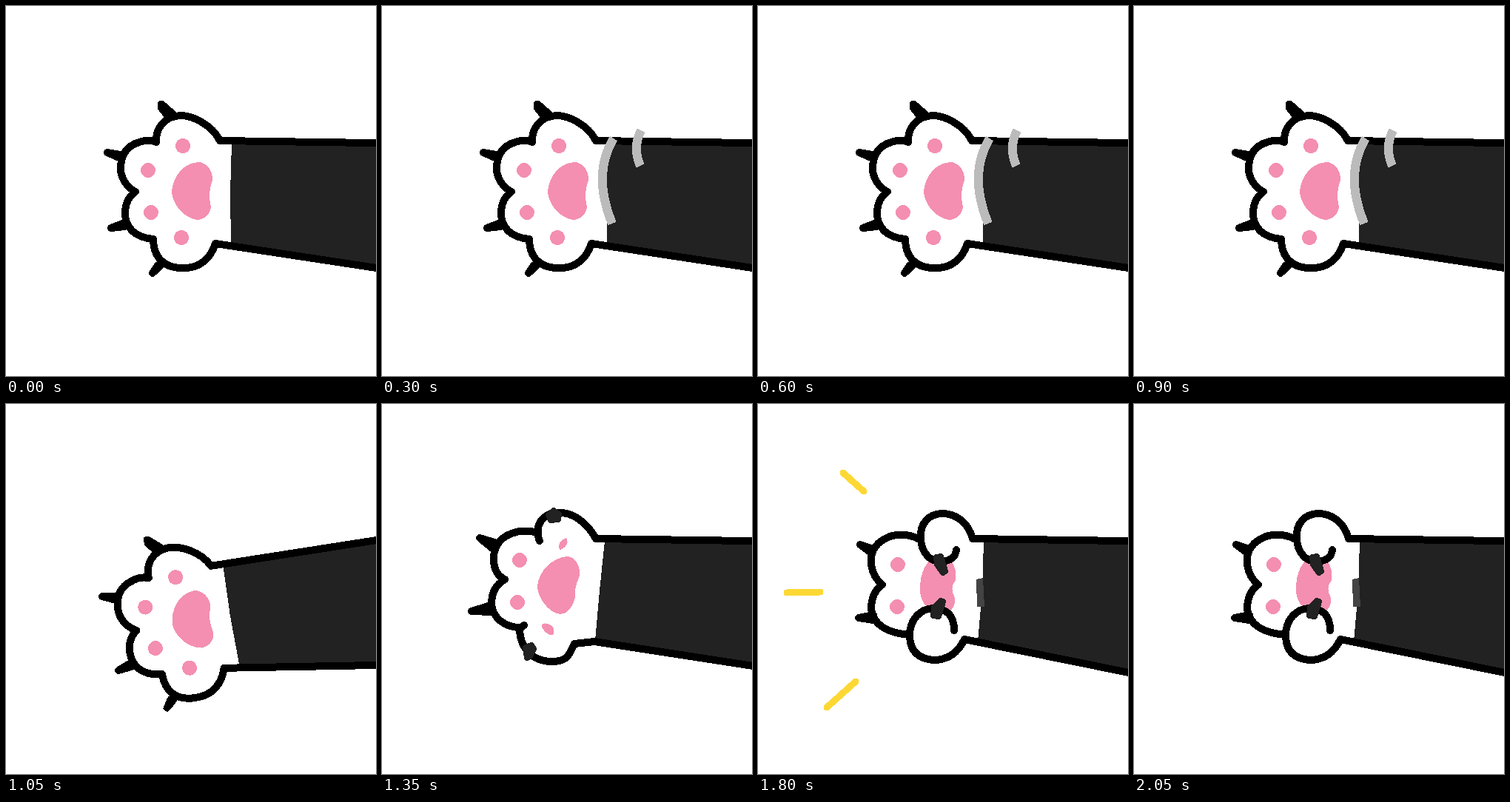
An HTML page for the animation above (2.55 s loop, 500 px wide and 500 px high).

```html
<!DOCTYPE html>
<html lang="en">
<head>
<meta charset="utf-8">
<title>Cat paw</title>
<style>
  html, body { margin: 0; width: 100%; height: 100%; overflow: hidden; background: #fff; }
  svg { display: block; width: 100%; height: 100%; }
  path { stroke-linecap: round; stroke-linejoin: round; fill: none; }
</style>
</head>
<body>
<svg viewBox="0 0 500 500" shape-rendering="crispEdges">
  <g id="paw"></g>
  <path id="swish" stroke="#bbb" stroke-width="12" style="stroke-linecap:butt"
    d="M313,179C293,212 293,250 311,294M350,168C342,184 342,200 349,216"/>
  <g id="rays" stroke="#fdd835" stroke-width="9">
    <path d="M131,109L159,134"/>
    <path d="M70,255L115,254"/>
    <path d="M116,387L155,352"/>
  </g>
</svg>
<script>
const PINK = '#f48fb1', DARK = '#222';

// Layers from back to front; every pose lists one path per layer.
const layers = [
  { name: 'sleeve', fill: DARK },
  { name: 'pad', fill: PINK },
  { name: 'midToes', stroke: '#000', width: 10 },
  { name: 'dots', stroke: PINK, width: 20 },
  { name: 'arm', stroke: '#000', width: 10 },
  { name: 'outerToes', fill: '#fff', stroke: '#000', width: 10 },
  { name: 'beans', fill: PINK },
  { name: 'claws', stroke: '#000', width: 10 },
  { name: 'tips', fill: DARK, stroke: DARK, width: 8 },
  { name: 'cuff', fill: '#444' }
];

const open = {
  sleeve: 'M305,185L560,186L560,362L304,322L303,252Z',
  pad: 'M260,211C270,211 280,222 279,235C274,250 274,258 277,272C275,285 265,289 258,289C238,286 224,265 224,250C226,230 240,212 260,211Z',
  midToes: 'M203,184C196,181 188,181 180,184C160,190 155,205 155,220C155,232 163,245 175,251C165,258 161,268 161,280C161,300 175,313 199,315',
  dots: 'M192,222L192,222M196,279L196,279',
  arm: 'M289,182L560,186M283,321L283,321L560,363',
  outerToes: 'M289,182C278,160 252,148 236,148C214,149 202,165 203,184C203,184 203,184 203,184C203,184 203,184 203,184' +
    'M283,321C276,343 260,355 238,354C211,354 199,337 199,315C199,315 199,315 199,315C199,315 199,315 199,315',
  beans: 'M239,179C252.3,179 252.3,199 239,199C225.7,199 225.7,179 239,179M237,303C250.3,303 250.3,323 237,323C223.7,323 223.7,303 237,303',
  claws: 'M137,198L155,201M137,198L155,206M142,300L160,293M142,300L160,298',
  tips: 'M209,132L211,132L226,145L217,148L209,138L209,132M197,361L204,350L210,351L205,356L198,362L197,361',
  cuff: 'M300,250L300,250L300,250L300,250Z'
};

const curled = {
  sleeve: 'M301,185L560,186L560,362L288,320L294,252Z',
  pad: 'M250,206C262,206 268,220 267,232C262,245 260,250 261,262C258,275 250,284 241,284C225,282 210,262 210,246C212,225 230,208 250,206Z',
  midToes: 'M211,175C200,170 185,171 175,175C155,182 150,200 151,212C152,225 156,232 166,237C152,245 148,258 148,270C149,288 165,302 187,302',
  dots: 'M186,211L186,211M183,268L183,268',
  arm: 'M289,182L560,186M260,324L287,321L560,363',
  outerToes: 'M289,182C280,165 262,148 243,147C225,145 208,156 211,177C211,180 212,183 213,185C213,185 213,185 213,185' +
    'M260,324C252,342 248,348 230,348C201,348 186,327 186,303C188,302 190,301 192,299C192,299 192,299 192,299',
  beans: 'M249,181C254,188 246,196 240,197C236,192 241,183 249,181M217,297C228,294 236,305 231,312C225,314 213,303 217,297',
  claws: 'M132,181L152,187M132,181L149,195M121,280L147,272M121,280L148,281',
  tips: 'M225,150L232,144L239,149L238,156L228,157L225,150M194,329L202,326L205,331L200,341L196,343L194,329',
  cuff: open.cuff
};

const squeezed = {
  sleeve: 'M305,185L560,186L560,362L297,322L303,252Z',
  pad: 'M250,206C268,206 271,225 269,236C265,245 265,256 269,265C271,280 268,290 256,291C222,290 211,270 211,250C211,230 220,206 250,206Z',
  midToes: 'M211,188C200,183 185,182 172,188C152,196 148,212 149,222C150,235 154,245 163,251C151,258 147,275 148,288C152,308 172,318 195,320',
  dots: 'M184,224L184,224M184,281L184,281',
  arm: 'M280,182L560,186M270,321L270,321L560,363',
  outerToes: 'M280,182C274,160 258,149 239,149C220,149 210,165 211,183C212,205 228,219 245,219C258,218 264,212 264,204' +
    'M270,321C262,338 247,346 229,346C208,346 197,333 197,316C198,295 212,283 232,281C248,282 256,290 259,299',
  beans: 'M241,205C241,205 241,205 241,205C241,205 241,205 241,205M234,295C234,295 234,295 234,295C234,295 234,295 234,295',
  claws: 'M132,195L152,197M132,195L148,207M127,286L146,281M127,286L147,290',
  tips: 'M238,190L240,191L246,219L241,220L238,205L238,190M231,292L238,282L242,284L239,296L223,318L231,292',
  cuff: 'M295,237L304,233L306,270L296,268Z'
};

const gripped = {
  sleeve: 'M305,185L560,186L560,374L297,321L303,252Z',
  pad: 'M248,206C264,206 269,225 267,238C261,246 261,252 266,262C266,272 265,279 255,280C228,282 219,268 219,250C219,230 226,206 248,206Z',
  midToes: 'M216,182C205,176 185,174 172,182C154,191 152,205 153,217C155,230 160,238 168,244C157,252 153,265 153,277C156,300 178,310 205,312',
  dots: 'M189,217L189,217M188,274L188,274',
  arm: 'M290,182L560,186M279,318L279,318L560,375',
  outerToes: 'M290,182C284,160 268,148 248,148C230,149 219,162 220,180C220,200 232,213 247,213C262,212 267,206 268,197' +
    'M279,318C270,337 255,346 237,346C215,344 206,332 205,315C204,292 219,276 238,276C255,277 265,285 265,306',
  beans: squeezed.beans,
  claws: 'M138,190L156,196M138,190L154,202M136,289L156,285M136,289L156,292',
  tips: 'M241,207L247,206L253,226L250,228L242,217L241,207M238,275L247,266L250,267L244,287L237,286L238,275',
  cuff: 'M295,237L304,235L306,274L296,274Z'
};

// Blends two poses number by number.
function mix(a, b, amount) {
  const pose = {};
  for (const { name } of layers) {
    const ends = b[name].match(/[\d.]+/g);
    let i = 0;
    pose[name] = a[name].replace(/[\d.]+/g, n => +n + (ends[i++] - n) * amount);
  }
  return pose;
}

const up = { pose: open, turn: 5.4 };
const middle = { pose: open, swish: true };
const down = { pose: open, turn: -9.7 };

const timeline = [
  [0, { pose: open }],
  [150, up], [300, middle], [450, down], [600, middle],
  [750, up], [900, middle], [1050, down],
  [1200, { pose: { ...mix(open, curled, 0.5), tips: curled.tips } }],
  [1350, { pose: curled }],
  [1450, { pose: mix(curled, squeezed, 0.5) }],
  [1550, { pose: squeezed, rays: [[0, 0], [0, 0], [0, 0]] }],
  [1650, { pose: gripped }],
  [1800, { pose: gripped, rays: [[-16, -16], [-31, 0], [-23, 23]] }],
  [2050, { pose: gripped }]
];
const LOOP = 2550;

const paw = document.getElementById('paw');
const swish = document.getElementById('swish');
const rays = document.getElementById('rays');

for (const layer of layers) {
  const path = document.createElementNS('http://www.w3.org/2000/svg', 'path');
  path.style.fill = layer.fill || 'none';
  path.style.stroke = layer.stroke || 'none';
  path.style.strokeWidth = layer.width || 0;
  layer.path = paw.appendChild(path);
}

function show(state) {
  for (const { name, path } of layers) path.setAttribute('d', state.pose[name]);
  const tips = layers.find(layer => layer.name === 'tips').path;
  tips.style.fill = tips.style.stroke = state.pose === open ? '#000' : DARK;
  paw.setAttribute('transform', `rotate(${state.turn || 0} 500 270)`);
  swish.style.display = state.swish ? '' : 'none';
  rays.style.display = state.rays ? '' : 'none';
  if (state.rays) {
    state.rays.forEach((shift, i) => rays.children[i].setAttribute('transform', `translate(${shift})`));
  }
}

let current;
function tick() {
  const time = performance.now() % LOOP;
  const state = timeline.filter(([start]) => start <= time).pop()[1];
  if (state !== current) show(current = state);
  requestAnimationFrame(tick);
}
tick();
</script>
</body>
</html>
```
